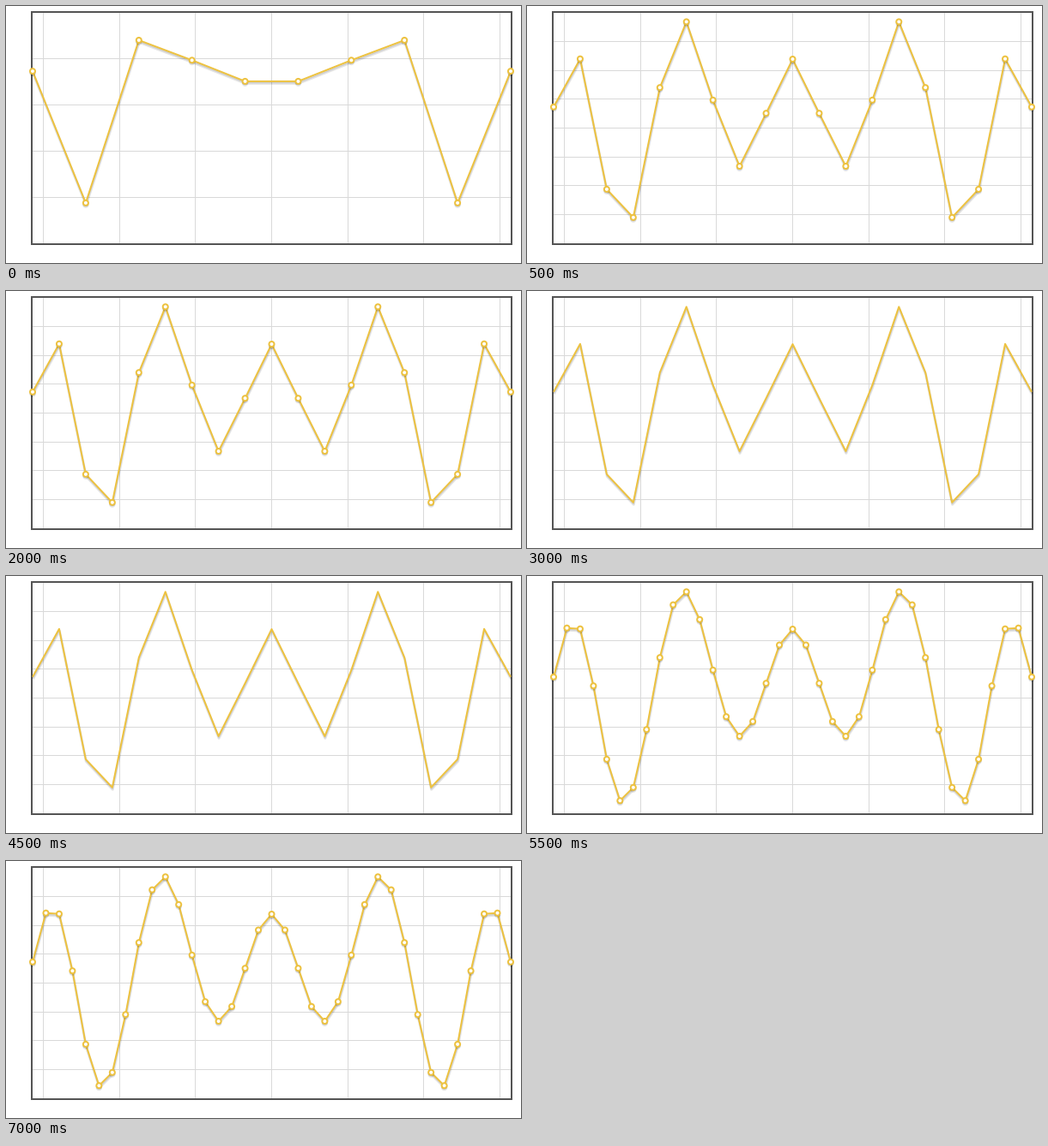
A matplotlib script that plays this animation: 600 px wide and 300 px high, repeating every 8000 ms.

```python
import numpy as np
import matplotlib.pyplot as plt
from matplotlib.animation import FuncAnimation
from matplotlib.collections import LineCollection, PatchCollection
from matplotlib.patches import Circle, Rectangle

plt.rcParams["path.simplify"] = False

W, H, DPI = 600, 300, 100
PX = 72 / DPI  # one pixel in points
LEFT, RIGHT, TOP, BOTTOM = 31, 588, 8, 277
GOLD = "#edc240"
INTERVAL = 500

# Left half of the mirrored curve, from the edge to the middle.
HALF = [117.8, 60.7, 61.7, 128.2, 213.9, 262.2, 246.8, 179.2, 95.2, 33.6,
        18.4, 50.8, 109.8, 164.2, 187, 169.8, 125.2, 80.5, 62]
CURVE = np.array(HALF + HALF[-2::-1])
XS = np.linspace(LEFT, RIGHT, len(CURVE))

fig = plt.figure(figsize=(W / DPI, H / DPI), dpi=DPI, facecolor="white")
ax = fig.add_axes([0, 0, 1, 1])
ax.set_xlim(0, W)
ax.set_ylim(H, 0)
ax.axis("off")


def stroke(xs, ys, width, color, alpha=1, z=3):
    line, = ax.plot(xs, ys, color=color, alpha=alpha, lw=width * PX, zorder=z,
                    solid_capstyle="butt", solid_joinstyle="round", snap=False)
    return line


def grid_rows(count):
    ys = np.floor(TOP + (BOTTOM - TOP) / count * np.arange(1, count)) + 0.5
    return [stroke([LEFT, RIGHT], [y, y], 1, "#d9d9d9", z=1) for y in ys]


def polyline(xs, ys):
    parts = []
    angle = np.pi / 18
    for width, dist in ((3, 2.5), (1.5, 1.75)):
        parts.append(stroke(xs + np.sin(angle) * dist, ys + np.cos(angle) * dist,
                            width, "black", 0.1))
    return parts + [stroke(xs, ys, 2, GOLD)]


def points(xs, ys):
    parts = []
    t = np.linspace(0, np.pi, 25)
    arc = 3 * np.column_stack([np.cos(t), np.sin(t)])
    for drop, alpha in ((2.25, 0.1), (0.75, 0.2)):
        arcs = [arc + (x, y + drop) for x, y in zip(xs, ys)]
        parts.append(LineCollection(arcs, colors="black", alpha=alpha,
                                    linewidths=1.5 * PX, capstyle="butt", zorder=4))
    parts.append(PatchCollection([Circle(p, 3) for p in zip(xs, ys)],
                                 facecolor="white", edgecolor=GOLD,
                                 linewidths=2 * PX, zorder=5))
    for part in parts:
        part.set_snap(False)
        ax.add_collection(part)
    return parts


def chart(step, rows, lines=True, dots=True):
    xs, ys = XS[::step], CURVE[::step]
    if rows == 5:  # narrower value range: stretch about the lowest shared tick
        ys = BOTTOM + 1.6 * (ys - 243.375)
    parts = grid_rows(rows)
    if lines:
        parts += polyline(xs, ys)
    if dots:
        parts += points(xs, ys)
    return parts


unit = (RIGHT - LEFT) / (2 * np.pi)
for k in range(-3, 4):
    x = np.floor((LEFT + RIGHT) / 2 + k * unit) + 0.5
    stroke([x, x], [TOP, BOTTOM], 1, "#d9d9d9", z=1)

ax.add_patch(Rectangle((LEFT - 1, TOP - 1), RIGHT - LEFT + 2, BOTTOM - TOP + 2,
                       fill=False, edgecolor="#545454", lw=2 * PX,
                       joinstyle="miter", snap=False, zorder=2))

charts = [chart(4, 5), chart(2, 8), chart(2, 8, dots=False), chart(1, 8)]


def draw(i):
    current = (i + 4) // 5
    for n, parts in enumerate(charts):
        for part in parts:
            part.set_visible(n == current)
    return [part for parts in charts for part in parts]


anim = FuncAnimation(fig, draw, frames=16, interval=INTERVAL,
                     repeat=True, repeat_delay=0, blit=False)
plt.show()
```
